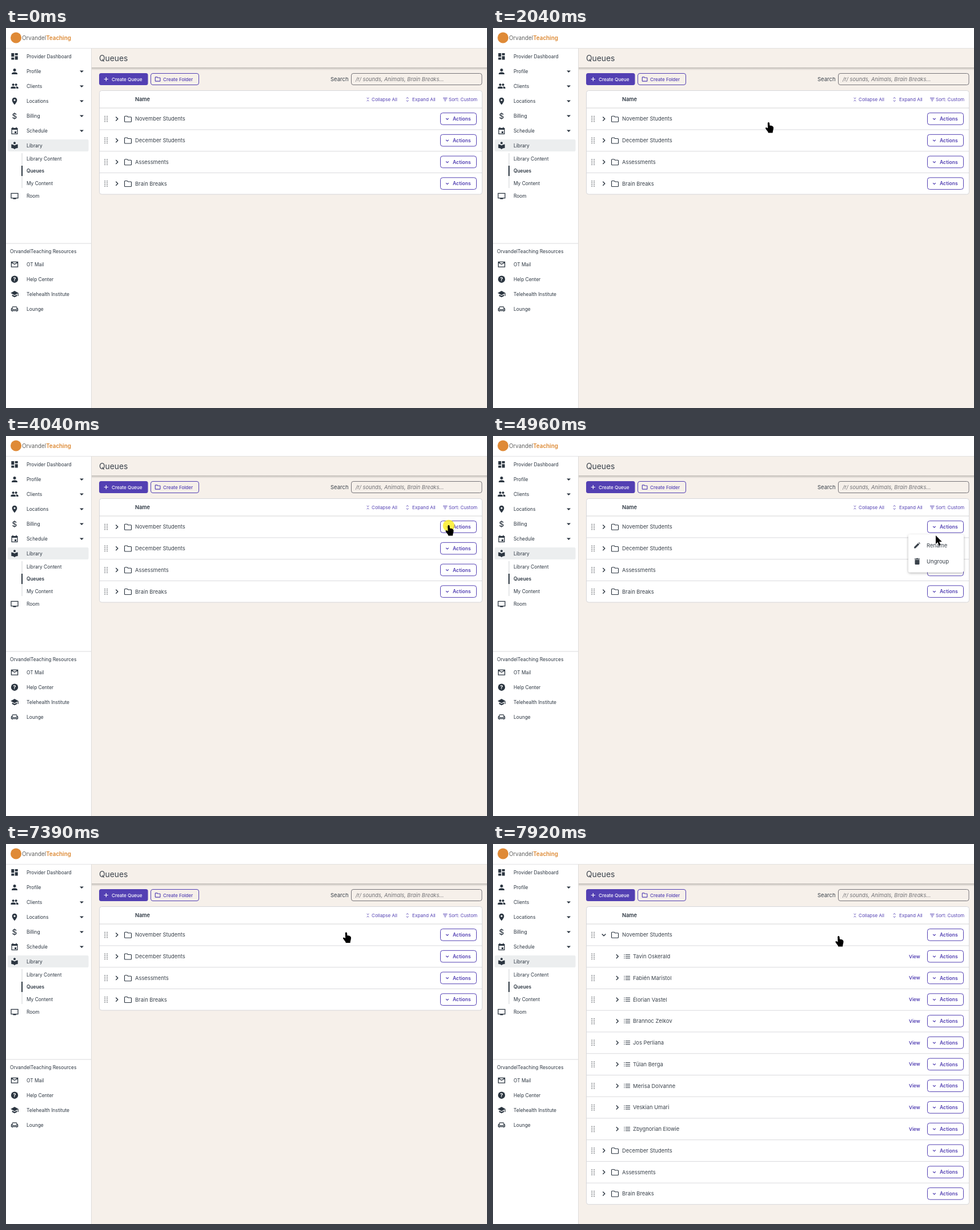
Write an HTML page that moves like this. It is 842x665 px and loops after 8 s.

```html
<!DOCTYPE html>
<html lang="en">
<head>
<meta charset="utf-8">
<title>Queues</title>
<style>
  html, body { margin: 0; width: 842px; height: 665px; overflow: hidden; background: #f6f0ea; }
  svg { display: block; font-family: Inter, sans-serif; }
  .line { fill: none; stroke-width: 1.3; }
</style>
</head>
<body>
<svg id="stage" width="842" height="665" viewBox="0 0 842 665"></svg>
<script>
const INK = '#2b3540', TEXT = '#3a424b', PURPLE = '#5340b3', BORDER = '#d6d6d9';

// Text is placed by its left edge and the middle of its capitals.
const text = (x, y, size, str, fill = TEXT, weight = 400, extra = '') =>
  `<text x="${x}" y="${y + size * 0.363}" font-size="${size}" fill="${fill}" font-weight="${weight}" ${extra}>${str}</text>`;
const box = (x, y, w, h, fill, stroke = 'none', r = 0) =>
  `<rect x="${x}" y="${y}" width="${w}" height="${h}" rx="${r}" fill="${fill}" stroke="${stroke}"/>`;
const line = (d, color = INK, width = 1.3) =>
  `<path class="line" d="${d}" stroke="${color}" style="stroke-width:${width}"/>`;
const at = (x, y, content) => `<g transform="translate(${x} ${y})">${content}</g>`;
const solid = (d, fill = INK) => `<path d="${d}" fill="${fill}" fill-rule="evenodd"/>`;
const dot = (x, y, r, fill = INK) => `<circle cx="${x}" cy="${y}" r="${r}" fill="${fill}"/>`;

// Icons are drawn around their own centre.
const person = solid('M-5 5V3.8C-5 .3 5 .3 5 3.8V5z') + dot(0, -2.6, 2.5);
const folder = (k, color) => line(`M${-6 * k} ${-4 * k}q0-${k} ${k}-${k}h${3.6 * k}l${1.4 * k} ${1.5 * k}h${5 * k}q${k} 0 ${k} ${k}v${6.5 * k}q0 ${k}-${k} ${k}h${-10 * k}q${-k} 0 ${-k} ${-k}z`, color, 1.15);
const icons = {
  dashboard: solid('M-5.7-6h5v6.3h-5zM.7-6h5v3.8h-5zM-5.7 1.8h5v3.8h-5zM.7-.7h5v6.3h-5z'),
  person,
  people: dot(-2.4, -2.7, 2) + dot(2.6, -2.7, 2) +
    solid('M-6.6 4V2.5C-6.6-.5 2-.5 2 2.5V4zM3 4V2.4C3 1.4 2.6.7 2 .2 4.2 0 6.6.9 6.6 2.5V4z'),
  pin: solid('M0-6.2C-2.5-6.2-4.4-4.3-4.4-1.8-4.4 1.6 0 6.3 0 6.3S4.4 1.6 4.4-1.8C4.4-4.3 2.5-6.2 0-6.2zM0-3.4a1.6 1.6 0 1 1 0 3.2a1.6 1.6 0 1 1 0-3.2z'),
  dollar: text(-4.4, 0, 13.5, '$', INK, 500),
  calendar: line('M-4.9-4.4h9.8v9.8h-9.8z') + solid('M-5-5H5v3H-5zM-3.7-6.6h1.4V-4h-1.4zM2.3-6.6h1.4V-4H2.3zM0 1h3v3H0z'),
  library: dot(0, -4.2, 2) + solid('M-5.7-2C-3.3-2-1.3-1 0 .2 1.3-1 3.3-2 5.7-2V4.6C3.3 4.6 1.3 5.4 0 6.8-1.3 5.4-3.3 4.6-5.7 4.6z'),
  monitor: line('M-6-4.6H6v8.3H-6zM-2.6 4.8H2.6', INK, 1.3),
  mail: line('M-5.6-4.3H5.6v8.7H-5.6zM-5.6-3.8 0-.2 5.6-3.8'),
  help: dot(0, 0, 6.2) + text(-2.8, 0, 9.5, '?', '#fff', 700),
  school: solid('M0-5.6 6.8-1.9 0 1.8-6.8-1.9zM-4.3.7 0 3-1.6 2.2 0 3 4.3.7V3.2L0 5.5-4.3 3.2zM5.6-1.6h1.2V3.4H5.6z'),
  couch: line('M-4 0v-2.5q0-1.3 1.3-1.3h5.4q1.3 0 1.3 1.3V0M-5.6-.6v3.6H5.6V-.6q-1.6-.6-1.8 1.6h-7.6q-.2-2.2-1.8-1.6zM-3.8 3v1.6M3.8 3v1.6', INK, 1.2),
};

const navItem = (icon, y, label) => at(15, y, icons[icon]) + text(36, y, 8.4, label, INK);
const caret = y => solid(`M129 ${y - 1.5}h7l-3.5 3.6z`);

function sidebar() {
  const main = [['dashboard', 'Provider Dashboard'], ['person', 'Profile'], ['people', 'Clients'],
    ['pin', 'Locations'], ['dollar', 'Billing'], ['calendar', 'Schedule']];
  const resources = [['mail', 'OT Mail'], ['help', 'Help Center'], ['school', 'Telehealth Institute'], ['couch', 'Lounge']];
  return box(0, 0, 149, 665, '#fff') + box(149, 0, 1, 665, '#dfdddb') + box(0, 35, 149, 1, '#e3e3e5') +
    dot(17.5, 17, 9.5, '#df8a37') +
    text(28, 17.3, 9.8, 'Orvandel<tspan fill="#dc8730" font-weight="600">Teaching</tspan>', '#60605f') +
    main.map(([icon, label], i) => navItem(icon, 50 + i * 26, label) + (i ? caret(50 + i * 26) : '')).join('') +
    box(3, 195, 141.5, 21, '#eceeef', 'none', 2) + navItem('library', 205.5, 'Library') +
    box(27.5, 219, 1, 61, '#cfd2d5') + box(27, 241, 2, 18, INK) +
    text(36, 229, 8.4, 'Library Content', INK) + text(36, 250.3, 8.3, 'Queues', INK, 600) + text(36, 271.5, 8.4, 'My Content', INK) +
    navItem('monitor', 294, 'Room') +
    box(0, 376.5, 149, 1, '#dcdcde') + text(7, 390.7, 8.4, 'OrvandelTeaching Resources', INK) +
    resources.map(([icon, label], i) => navItem(icon, 413.7 + i * 26, label)).join('');
}

function header() {
  return box(149, 0, 693, 35, '#fff') + box(149, 35, 693, 1, '#e3e1df') +
    text(163, 53, 13.8, 'Queues') + box(150, 69, 692, 5, 'url(#shade)') +
    box(163, 79, 85.5, 21, PURPLE, 'none', 3.5) + line('M171.7 89.5h7.2M175.3 85.9v7.2', '#fff', 1.2) +
    text(185, 89.6, 8.1, 'Create Queue', '#fff', 500) +
    box(253.5, 79.5, 84, 20, 'none', PURPLE, 3.5) + at(265.6, 89.5, folder(0.72, PURPLE)) +
    text(275, 89.6, 8.1, 'Create Folder', PURPLE, 500) +
    text(568, 89.5, 9.5, 'Search') + box(604.5, 79.5, 228.5, 20, 'none', '#77757a', 3.5) +
    text(612, 89.5, 9.3, '/r/ sounds, Animals, Brain Breaks...', '#717175', 400, 'font-style="italic"');
}

const PITCH = 37.75;
const chevron = (x, y, open) => line(open ? `M${x - 3.3} ${y - 1.6}l3.3 3.3 3.3-3.3` : `M${x - 1.7} ${y - 3.4}l3.4 3.4-3.4 3.4`, INK, 1.4);
const actions = y => box(760.5, y - 10.4, 63, 20.6, '#fff', PURPLE, 4) +
  line(`M770.2 ${y - 1}l2.3 2.2 2.3-2.2`, PURPLE, 1.1) + text(782, y, 8.6, 'Actions', PURPLE, 600);

function row(item, i) {
  const y = 159 + i * PITCH;
  let grip = '';
  for (let n = 0; n < 8; n++) grip += dot(173.2 + n % 2 * 3.8, y - 4.4 + (n >> 1) * 3, 0.95, '#6c7075');
  const label = item.child
    ? chevron(217.5, y) + line(`M232 ${y - 3}h8M232 ${y}h8M232 ${y + 3}h8M229.3 ${y - 3}h1.4M229.3 ${y}h1.4M229.3 ${y + 3}h1.4`, INK, 1.2) +
      text(245, y, 9.35, item.name) + text(728, y, 8.2, 'View', PURPLE, 600)
    : chevron(194, y, item.open) + at(213.5, y + 0.2, folder(1, INK)) + text(226, y, 9.35, item.name);
  return (i ? box(164, y - 19.3, 669, 1, '#dadadd') : '') + grip + label + actions(y);
}

function table(items) {
  return box(163.5, 109.5, 670, 31 + items.length * PITCH - 0.5, '#fff', BORDER, 4) + box(164, 139.5, 669, 1, '#d3d3d6') +
    text(226, 125, 9.2, 'Name', INK, 600) +
    line('M631.7 122l1.8 1.7 1.8-1.7M631.7 128l1.8-1.7 1.8 1.7M700.8 123.4l1.9-1.8 1.9 1.8M700.8 126.6l1.9 1.8 1.9-1.8', PURPLE, 1) +
    line('M765 122.6h7.6M766.3 125h5M767.6 127.4h2.4', PURPLE, 1) +
    text(640, 125.2, 8.1, 'Collapse All', PURPLE) + text(711, 125.2, 8.2, 'Expand All', PURPLE) + text(775, 125.2, 8.15, 'Sort: Custom', PURPLE) +
    items.map(row).join('');
}

const folders = ['November Students', 'December Students', 'Assessments', 'Brain Breaks'].map(name => ({ name }));
const students = ['Tavin Oskerald', 'Fabién Maristol', 'Élorian Vastel', 'Brannoc Zelkov', 'Jos Perliana',
  'Tülan Berga', 'Merisa Dolvanne', 'Veskian Umari', 'Zbygnorian Elowie'].map(name => ({ name, child: true }));

const menu = `<g filter="url(#drop)">${box(727, 172.5, 97, 66, '#fff', 'none', 3)}</g>` +
  at(742.5, 191.3, solid('M-5.3 5.3V3L1.5-3.8 3.8-1.5-3 5.3zM2.3-4.6 3.5-5.3 5.4-3.4 4.6-2.3z', TEXT)) +
  at(742.5, 219.5, solid('M-4-3h8v7.2q0 1.2-1.2 1.2h-5.6Q-4 5.4-4 4.2zM-4.6-5h2.8l.6-.7h2.4l.6.7h2.8v1.3h-9.2z', TEXT)) +
  text(759, 191.3, 9.5, 'Rename') + text(759, 219.5, 9.5, 'Ungroup');

const stage = document.getElementById('stage');
stage.innerHTML = `<defs>
    <linearGradient id="shade" x2="0" y2="1"><stop stop-color="#000" stop-opacity=".22"/><stop offset="1" stop-color="#000" stop-opacity="0"/></linearGradient>
    <filter id="drop" x="-20%" y="-20%" width="140%" height="140%"><feDropShadow dx="0" dy="1.5" stdDeviation="2" flood-opacity=".3"/></filter>
  </defs>` + sidebar() + header() +
  `<g id="closed">${table(folders)}</g>
  <g id="opened">${table([{ ...folders[0], open: true }, ...students, ...folders.slice(1)])}</g>
  <g id="menu">${menu}</g>
  <g id="pointer">
    <circle id="halo" r="10.3" cy="1" fill="#fbec1e" opacity=".8"/>
    <path id="arrow" d="M0 0V15L3.4 11.8 6 17.7 8.6 16.6 6.1 10.9H10.8z"/>
    <path id="hand" d="M-1.7 1.6C-1.6-.5 1.3-.5 1.5 1.6L2 5.8C5 5.4 8.4 7 8.5 9.3 8.7 12.5 7.4 14.5 7 18.6H-.6C-1 16-4 13.8-5.6 10.6-5.6 8.6-3.4 8.8-1.4 10.6z"/>
  </g>`;

const LOOP = 8000;
// Pointer moves: start, end, destination, and a skew below 1 for a quicker start.
const START = [784, 684];
const moves = [
  [270, 1120, 463, 275, 0.9], [1150, 1940, 482, 165, 0.9], [1990, 2040, 482.5, 165, 1],
  [2130, 3680, 775, 156, 0.85], [4510, 4960, 775, 174, 1], [5360, 6130, 609, 155, 0.9],
  [6740, 7000, 595.5, 154.5, 0.9], [7730, 7920, 605, 161, 1],
];
const within = (t, a, b) => t >= a && t < b;
const show = (id, on) => document.getElementById(id).setAttribute('display', on ? 'inline' : 'none');

function pointerAt(t) {
  let [x, y] = START;
  for (const [from, to, toX, toY, skew] of moves) {
    if (t <= from) break;
    const p = Math.min(1, (t - from) / (to - from)) ** skew;
    const eased = p * p * (3 - 2 * p);
    x += (toX - x) * eased;
    y += (toY - y) * eased;
  }
  return [x, y];
}

function render(now) {
  const t = now % LOOP;
  const menuOpen = within(t, 4190, 6790);
  const expanded = t >= 7490;
  const hand = t >= 1180 && !menuOpen;
  show('closed', !expanded);
  show('opened', expanded);
  show('menu', menuOpen);
  show('hand', hand);
  show('arrow', !hand);
  show('halo', within(t, 4040, 4090) || within(t, 6670, 6740) || within(t, 7320, 7390));
  document.getElementById('pointer').setAttribute('transform', `translate(${pointerAt(t)})`);
  requestAnimationFrame(render);
}
render(performance.now());
</script>
</body>
</html>
```
